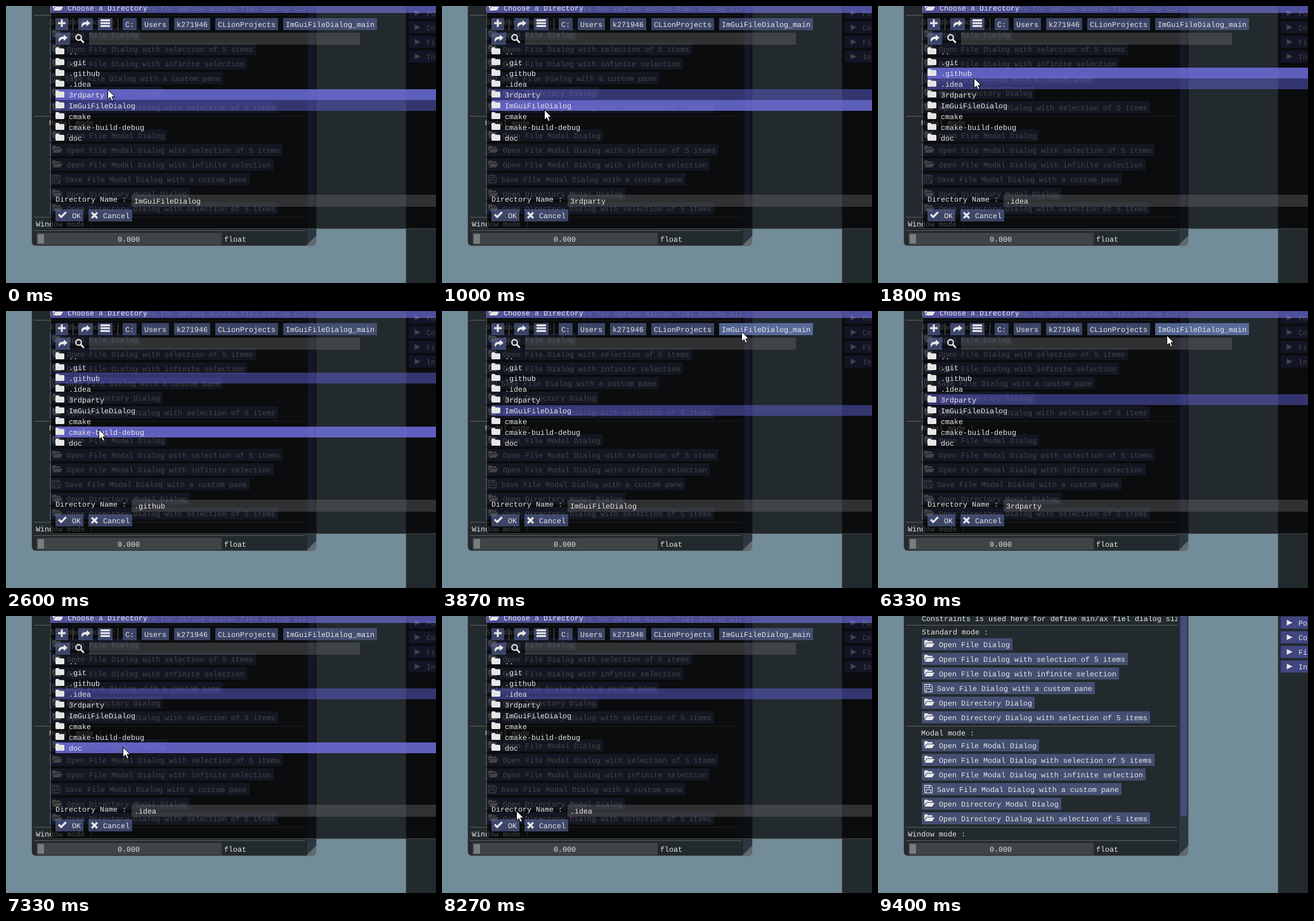
Animation of 678 by 436 pixels, one loop 9.87 s. Source, as an HTML page:

```html
<!DOCTYPE html>
<html lang="en">
<head>
<meta charset="utf-8">
<title>Directory dialog</title>
<style>
html, body { margin: 0; width: 678px; height: 436px; overflow: hidden; background: #738c99; }
svg { display: block; }
text {
  font: 11.667px "Liberation Mono", monospace;
  fill: #e6e6e6; white-space: pre; text-rendering: geometricPrecision;
}
rect, line { shape-rendering: crispEdges; }
</style>
</head>
<body>
<svg id="stage" width="678" height="436" viewBox="0 0 678 436">
  <defs>
    <clipPath id="inner"><rect x="40" y="0" width="432" height="436"/></clipPath>
  </defs>
  <g id="back"></g>
  <g id="dialog"></g>
  <g id="pointer">
    <path d="M.5 .5V16.2L4.2 12.8L6.8 18.5L9.4 17.4L6.9 11.8H11.8Z" fill="#fff" stroke="#000" stroke-width="1"/>
  </g>
</svg>
<script>
const NS = "http://www.w3.org/2000/svg";
const byId = id => document.getElementById(id);
const back = byId("back"), dialog = byId("dialog"), pointer = byId("pointer");

const BTN = "rgba(89,102,156,.62)", BTN_HOT = "rgba(102,122,181,.79)";
const FRAME = "rgba(110,110,110,.39)", SHADE = "rgba(0,0,0,.7)";
const EDGE = "rgba(128,128,128,.5)", RULE = "rgba(128,128,128,.6)";
const PICKED = "rgba(102,102,230,.45)", HOT = "rgba(115,115,230,.8)";
const INK = "#e6e6e6";

function add(parent, tag, attrs) {
  const el = document.createElementNS(NS, tag);
  for (const k in attrs) el.setAttribute(k, attrs[k]);
  parent.appendChild(el);
  return el;
}
const box = (p, x, y, width, height, fill, rx = 0) =>
  add(p, "rect", { x, y, width, height, fill, rx });
const shape = (p, d, fill, more) => add(p, "path", { d, fill, ...more });

// Text is placed by the vertical middle of its capitals.
function label(p, x, mid, str) {
  const el = add(p, "text", { x, y: mid + 4 });
  el.textContent = str;
  return el;
}

const ICONS = {
  folder: "M0 1.5Q0 0 1.5 0H5L6.5 1.8H12.5Q14 1.8 14 3.3V9.5Q14 11 12.5 11H1.5Q0 11 0 9.5Z",
  open: "M0 9.3V1.5Q0 0 1.5 0H4.5L6 1.6H11.5Q13 1.6 13 3V4H4.6Q3.4 4 2.8 5ZM.6 11L3.6 5.6Q4 5 4.8 5H16L13 10.2Q12.5 11 11.6 11Z",
  save: "M.5 .5H10L12.5 3V12.5H.5ZM3 .5V4.5H9V.5M3 12.5V7.5H10V12.5M7 1.5V3.5",
  plus: "M4.5 0H7.5V4.5H12V7.5H7.5V12H4.5V7.5H0V4.5H4.5Z",
  turn: "M9 0L15 5L9 10V7Q3.5 6.6 1.6 12Q-1.4 3.4 9 3Z",
  list: "M0 0H15V3H0ZM0 4.5H15V7.5H0ZM0 9H15V12H0Z",
  check: "M0 6.3L2.2 4.1L5 6.9L11.6 .3L13.8 2.5L5 11.2Z",
  cross: "M0 2.2L2.2 0L5.5 3.3L8.8 0L11 2.2L7.7 5.5L11 8.8L8.8 11L5.5 7.7L2.2 11L0 8.8L3.3 5.5Z"
};
function icon(p, name, x, y) {
  const line = name === "save";
  return shape(p, ICONS[name], line ? "none" : INK, {
    transform: `translate(${x} ${y})`, stroke: line ? INK : "none"
  });
}

function buildBack() {
  shape(back, "M40.5 -9V370Q40.5 377.5 47.5 377.5H482Q489.5 377.5 489.5 370V-9Z", SHADE, { stroke: EDGE });
  shape(back, "M475 -9H489V370Q489 377 482 377H475Z", "rgba(51,64,77,.6)");
  box(back, 477, -20, 10, 335, "rgba(102,102,204,.45)", 4);
  shape(back, "M473.5 377L489.5 361V370Q489.5 377 482.5 377Z", "rgba(255,255,255,.25)");

  const head = label(back, 69, 4, "Constraints is used here for define min/ax fiel dialog size");
  head.setAttribute("clip-path", "url(#inner)");
  for (const y of [14, 173, 332, 353]) box(back, 44, y, 428, 1, RULE);
  label(back, 69, 25, "Standard mode :");
  label(back, 68, 184, "Modal mode :");
  label(back, 47, 343, "Window mode :");

  const five = " with selection of 5 items", many = " with infinite selection";
  const pane = " with a custom pane";
  const group = (top, kind, last) => [
    `Open File${kind} Dialog`, `Open File${kind} Dialog${five}`, `Open File${kind} Dialog${many}`,
    `Save File${kind} Dialog${pane}`, `Open Directory${kind} Dialog`, last
  ].forEach((str, i) => {
    const mid = top + i * 23, save = str.startsWith("Save");
    const x = save ? 93 : 96;
    box(back, 69, mid - 10, x + str.length * 7 + 4 - 69, 19, BTN);
    if (save) icon(back, "save", 73, mid - 7);
    else icon(back, "open", 73, mid - 7);
    label(back, x, mid, str);
  });
  const last = "Open Directory Dialog" + five;
  group(45, "", last);
  group(204, " Modal", last);

  box(back, 48, 357, 292, 19, FRAME);
  box(back, 50, 359, 10, 15, "rgba(255,255,255,.3)");
  label(back, 176, 367, "0.000");
  label(back, 344, 367, "float");

  shape(back, "M630.5 -9H700V450H630.5Z", SHADE, { stroke: EDGE });
  ["Po", "Co", "Fi", "In"].forEach((str, i) => {
    const mid = 11 + i * 23;
    box(back, 635, mid - 10, 60, 19, PICKED);
    shape(back, `M644.5 ${mid - 5}L653.5 ${mid - .5}L644.5 ${mid + 4}Z`, INK);
    label(back, 663, mid, str);
  });
}

const NAMES = ["..", ".git", ".github", ".idea", "3rdparty", "ImGuiFileDialog",
  "cmake", "cmake-build-debug", "doc"];
const TOP = 63, STEP = 17;
const buttons = [], bands = [];
let field;

function button(x, y, width, height = 19) {
  const el = box(dialog, x, y, width, height, BTN);
  buttons.push({ el, x, y, width, height });
}

function buildDialog() {
  shape(dialog, "M70 11H700V351H77Q70 351 70 344Z", SHADE);
  box(dialog, 70, -9, 630, 20, "rgba(82,82,161,.87)");
  shape(dialog, "M70.5 -9V344Q70.5 350.5 77 350.5H700", "none", { stroke: EDGE });
  icon(dialog, "open", 74, -4);
  label(dialog, 97, 3, "Choose a Directory");

  button(78, 19, 20);
  icon(dialog, "plus", 82, 21);
  box(dialog, 105, 19, 1, 19, RULE);
  button(114, 19, 23);
  icon(dialog, "turn", 118, 22);
  button(145, 19, 23);
  icon(dialog, "list", 149, 21);
  box(dialog, 176, 19, 1, 19, RULE);
  let x = 184;
  for (const str of ["C:", "Users", "k271946", "CLionProjects", "ImGuiFileDialog_main"]) {
    const w = str.length * 7 + 8;
    button(x, 19, w);
    label(dialog, x + 4, 29, str);
    x += w + 8;
  }

  button(78, 42, 23);
  icon(dialog, "turn", 82, 45);
  add(dialog, "circle", { cx: 114.5, cy: 49.5, r: 4.3, fill: "none", stroke: INK, "stroke-width": 2.2 });
  shape(dialog, "M118 53L122 57", "none", { stroke: INK, "stroke-width": 2.8, "stroke-linecap": "round" });
  box(dialog, 131, 42, 427, 19, FRAME);

  NAMES.forEach((str, i) => {
    const y = TOP + i * STEP;
    bands.push(box(dialog, 78, y, 600, STEP, "none"));
    icon(dialog, "folder", 78, y + 2);
    label(dialog, 99, y + 9, str);
  });

  label(dialog, 78, 304, "Directory Name :");
  box(dialog, 198, 297, 490, 19, FRAME);
  field = label(dialog, 202, 307, "");
  button(78, 320, 44);
  icon(dialog, "check", 82, 323);
  label(dialog, 104, 330, "OK");
  button(130, 320, 69);
  icon(dialog, "cross", 134, 324);
  label(dialog, 153, 330, "Cancel");
}

// Pointer stops: time, x, y.
const PATH = [
  [0, 160, 131], [200, 161, 131], [600, 158, 106],
  [860, 158, 106], [1000, 161, 163], [1070, 160, 160],
  [1320, 160, 160], [1530, 152, 122],
  [1660, 152, 122], [1930, 150, 105], [2070, 150, 105], [2600, 146, 186],
  [2730, 148, 157],
  [3060, 148, 157], [3200, 150, 156], [3930, 478, 30],
  [4120, 478, 30], [4730, 150, 193], [5000, 146, 140],
  [5190, 146, 140], [5330, 150, 139], [6070, 476, 29],
  [6190, 476, 29], [6330, 455, 38], [6730, 176, 160], [6930, 160, 122],
  [7060, 160, 122], [7130, 162, 123], [7330, 184, 206], [8000, 176, 207],
  [8060, 176, 207], [8330, 108, 320],
  [8460, 108, 320], [8870, 104, 328],
  [9190, 104, 328], [9340, 83, 398], [9870, 83, 398]
];
// Selected row from each time on.
const PICKS = [[0, 5], [130, 4], [1070, 5], [1530, 3], [2000, 2], [3130, 5], [5260, 4], [7130, 3]];
const LOOP = 9870, CLOSE = 8670, GONE = 9395, TICK = 1000 / 15;

function pointerAt(t) {
  let i = 0;
  while (i < PATH.length - 2 && PATH[i + 1][0] <= t) i++;
  const [t0, x0, y0] = PATH[i], [t1, x1, y1] = PATH[i + 1];
  const u = Math.min(1, (t - t0) / (t1 - t0)), e = u * u * (3 - 2 * u);
  return [Math.round(x0 + (x1 - x0) * e), Math.round(y0 + (y1 - y0) * e)];
}

function draw(t) {
  const [x, y] = pointerAt(t);
  const picked = PICKS.filter(p => p[0] <= t + 4).pop()[1];
  const row = x >= 78 ? Math.floor((y - TOP) / STEP) : -1;
  pointer.setAttribute("transform", `translate(${x} ${y})`);
  pointer.style.display = t >= GONE ? "none" : "";
  dialog.style.display = t >= CLOSE - 5 ? "none" : "";
  bands.forEach((b, i) => b.setAttribute("fill", i === row ? HOT : i === picked ? PICKED : "none"));
  for (const b of buttons) {
    const over = x >= b.x && x < b.x + b.width && y >= b.y && y <= b.y + b.height;
    b.el.setAttribute("fill", over ? BTN_HOT : BTN);
  }
  field.textContent = NAMES[picked];
}

buildBack();
buildDialog();
const start = performance.now();
function frame() {
  const t = (performance.now() - start) % LOOP;
  draw(Math.round(Math.floor((t + 4) / TICK) * TICK / 10) * 10);
  requestAnimationFrame(frame);
}
draw(0);
requestAnimationFrame(frame);
</script>
</body>
</html>
```
